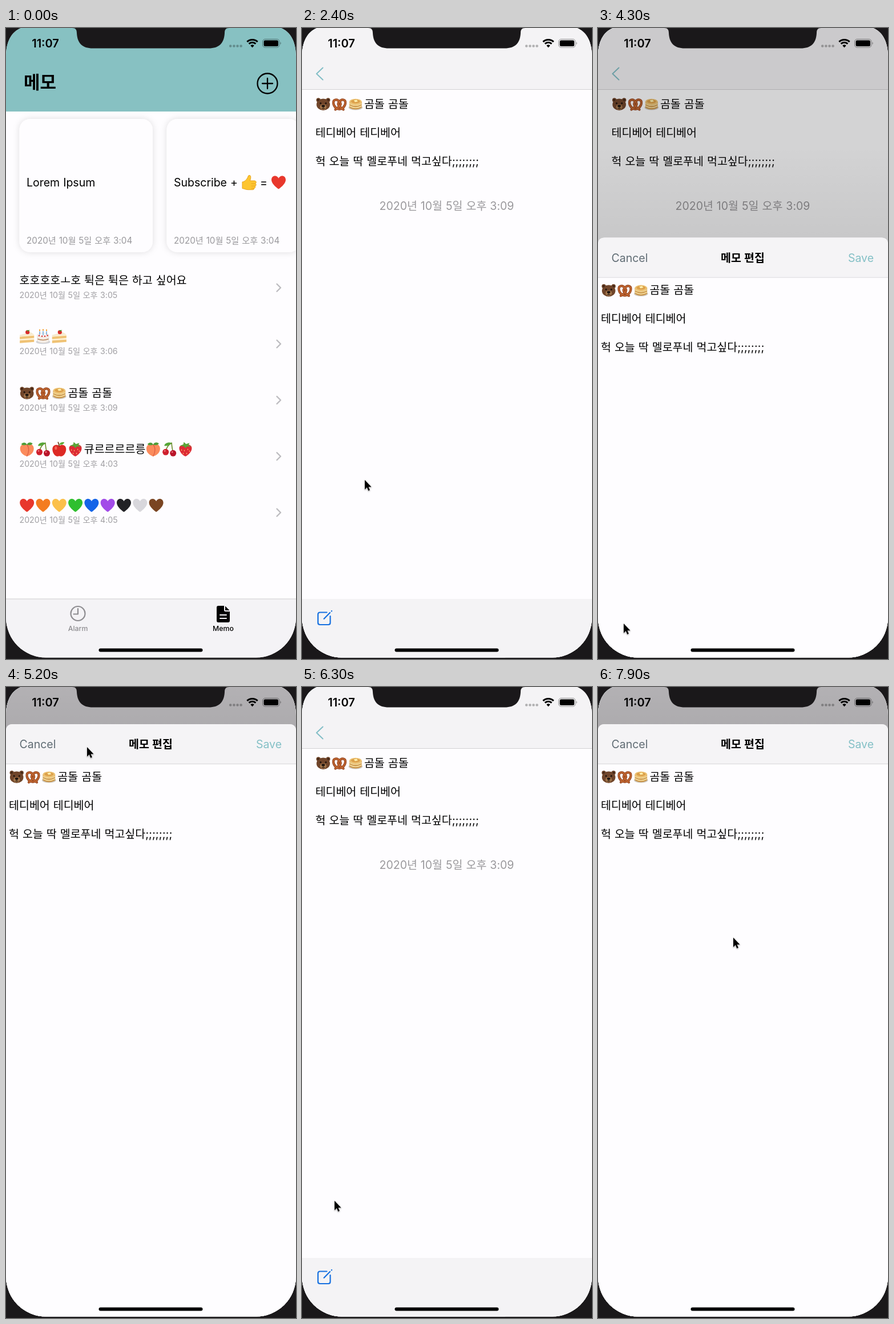
These frames come from a looping animation (508 by 1103 pixels, 8000 ms). An HTML page:

```html
<!DOCTYPE html>
<html lang="ko">
<head>
<meta charset="utf-8">
<title>메모</title>
<style>
html, body { margin: 0; height: 100%; overflow: hidden; background: #1a181a; }
svg { display: block; width: 100vw; height: 100vh; }
text { font: 19.5px Inter, "Noto Sans CJK KR", "Noto Sans CJK", sans-serif; word-spacing: .5px; white-space: pre; }
.line { fill: none; stroke-linecap: round; stroke-linejoin: round; }
</style>
</head>
<body>
<svg viewBox="0 0 508 1103">
<defs>
  <clipPath id="screen"><path d="M0 50C0 16 16-3 44-3H464C492-3 508 16 508 50V1031A70 70 0 0 1 438 1100.500H70A70 70 0 0 1 0 1031Z"/></clipPath>
  <clipPath id="shelf"><rect y="146" width="508" height="258"/></clipPath>
  <filter id="soft" x="-20%" y="-20%" width="140%" height="140%">
    <feDropShadow dx="0" dy="0" stdDeviation="6" flood-opacity=".13"/>
  </filter>
  <linearGradient id="fade" x2="0" y2="1">
    <stop stop-opacity="0"/><stop offset="1" stop-opacity=".08"/>
  </linearGradient>

  <path id="heart" d="M0 11.5C-6 7.5-12.5 1-12.5-4.5-12.5-9-9.5-11.5-6.3-11.5-3.5-11.5-1.2-9.8 0-7.2 1.2-9.8 3.5-11.5 6.3-11.5 9.5-11.5 12.5-9 12.5-4.5 12.5 1 6 7.5 0 11.5Z"/>
  <g id="thumb">
    <path fill="#fdc530" stroke="#e9a21c" d="M-12-1C-8-1-5-5-3-8-2-10-2-12.500.3-12.500 3.500-12.500 3.200-8 1.500-3H9C13-3 13 1.500 10.500 2 13 3 12.500 6 10 6.300 11.500 7.500 10.800 10 8.300 10.200 9 12 7.500 12.700 5.500 12.700H-2C-6 12.700-8 11-12 10.500Z"/>
    <path class="line" stroke="#e9a21c" d="M4 2H10M4 6.200H10M4 10.200H8"/>
  </g>
  <g id="slice">
    <path fill="#fff3d8" d="M-12.500-3 6-8 12.500-4V9L-12.500 11Z"/>
    <path fill="#efc275" d="M-12.500 0 12.500-2V2L-12.500 4ZM-12.500 6.500 12.500 5V9L-12.500 11Z"/>
    <path fill="#f6ead0" d="M-12.500-3 6-8 12.500-4-12.500 0Z"/>
    <circle cx="1" cy="-8" r="3.600" fill="#d92c2a"/><path fill="#4c9a35" d="M-1-11 5-12 2-9Z"/>
  </g>
  <g id="cake">
    <ellipse cy="9" rx="12.500" ry="3.500" fill="#cfd2d8"/>
    <path fill="#f5eee7" stroke="#d5cdc6" stroke-width=".6" d="M-10-3V8C-7 11.500 7 11.500 10 8V-3Z"/>
    <ellipse cy="-3" rx="10" ry="3.200" fill="#fff" stroke="#d9cfca" stroke-width=".6"/>
    <path class="line" stroke="#b8885f" stroke-width="1.500" d="M-9 4Q0 7.500 9 4"/>
    <path class="line" stroke="#6aa5d5" stroke-width="1.500" d="M-6-4V-9M0-3V-9.500M6-4V-9"/>
    <path class="line" stroke="#f39a24" stroke-width="2" d="M-6-11V-12M0-11.500V-12.500M6-11V-12"/>
    <path class="line" stroke="#d8322f" stroke-width="2.500" d="M-7-2H-6.900M-2-1H-1.900M3-1H3.100M7.500-2.200H7.600"/>
  </g>
  <g id="bear">
    <g fill="#70452a"><circle cx="-8.500" cy="-7" r="3.700"/><circle cx="8.500" cy="-7" r="3.700"/><ellipse cy=".8" rx="11.800" ry="10.200"/></g>
    <g fill="#432717"><circle cx="-8.800" cy="-7.300" r="1.900"/><circle cx="8.800" cy="-7.300" r="1.900"/></g>
    <ellipse cy="5" rx="5.500" ry="4.600" fill="#a87a4e"/>
    <g fill="#1c120d"><circle cx="-4.600" cy="-1.500" r="1.500"/><circle cx="4.600" cy="-1.500" r="1.500"/><ellipse cy="3.200" rx="3" ry="2"/></g>
    <path class="line" stroke="#1c120d" d="M0 5V7M-2.500 7.300Q0 8.800 2.500 7.300"/>
  </g>
  <g id="pretzel" class="line">
    <path id="twist" stroke="#91401d" stroke-width="4.200" d="M-7 9.500C1 4 5 0 0-4-4-10-11-8-10.500-2-10 5-4 9 0 9 4 9 10 5 10.500-2 11-8 4-10 0-4-5 0-1 4 7 9.500"/>
    <path stroke="#bf6530" stroke-width="2.200" d="M-7 9.500C1 4 5 0 0-4-4-10-11-8-10.500-2-10 5-4 9 0 9 4 9 10 5 10.500-2 11-8 4-10 0-4-5 0-1 4 7 9.500"/>
  </g>
  <g id="pancakes">
    <ellipse cy="6" rx="12.300" ry="4.500" fill="#cfc9c0"/>
    <path fill="#c79145" d="M-10.800-4V5.500C-7 10.500 7 10.500 10.800 5.500V-4Z"/>
    <path class="line" stroke="#f1d596" stroke-width="2.200" d="M-10-.5Q0 5 10-.5M-10 3.500Q0 9 10 3.500"/>
    <ellipse cy="-4" rx="11" ry="5.200" fill="#ecc274"/>
    <ellipse cy="-4.500" rx="8" ry="3.300" fill="#dca04a"/><path fill="#fff0ae" d="M-3-6.500 2-7.500 4-4.500-1-3.500Z"/>
  </g>
  <g id="peach">
    <path fill="#fb8b5c" d="M0-8C5-12 12-8 12-1 12 7 5 11 0 12.500-5 11-12 7-12-1-12-8-5-12 0-8Z"/>
    <path class="line" stroke="#dd5f43" stroke-width="1.300" d="M0-8C4-3 4 5 0 12"/>
    <path fill="#4f9d38" d="M0-8C-5-6-9-7-10-9-6-13-2-12 0-8 1-12 6-13 10-10 8-7 4-6 0-8Z"/>
  </g>
  <g id="cherry">
    <path class="line" stroke="#6d8a2d" stroke-width="1.600" d="M-6 3C-5-4-1-8 4-11 4-6 5-1 6 4"/>
    <path fill="#55a637" d="M4-11C-1-13-8-11-9-6-4-5 1-7 4-11Z"/>
    <circle cx="-6.500" cy="5" r="5.500" fill="#cf1f2d"/><circle cx="6.500" cy="7" r="5.500" fill="#b9152a"/>
    <g fill="#f2818a"><circle cx="-8" cy="3" r="1.300"/><circle cx="5" cy="5" r="1.300"/></g>
  </g>
  <g id="apple">
    <path fill="#dd2a24" d="M0-6C4-9 12-8 12 0 12 7 7 12.500 3.500 12.500 1.500 12.500 1 12 0 12-1 12-1.500 12.500-3.500 12.500-7 12.500-12 7-12 0-12-8-4-9 0-6Z"/>
    <path class="line" stroke="#6e4424" stroke-width="1.700" d="M0-5Q-.5-9-2-12"/>
    <path fill="#5dab36" d="M0-8C1-12 5-13 9-12 7-8 4-7 0-8Z"/><ellipse cx="-6" cy="-2" rx="2" ry="3" fill="#f0695c"/>
  </g>
  <g id="berry">
    <path fill="#de2b35" d="M-11-3C-10-9 8-11 10.500-4 13 3 4 11 0 12.500-4 12-12 4-11-3Z"/>
    <path fill="#58a538" d="M-10-6-4-8-3-12.500 1-9 7-11 5-7 10-4 3-5 0-2-3-5Z"/>
    <path class="line" stroke="#f8c06a" stroke-width="1.300" d="M-7 1V2M-2 2V3M4 0V1M-4 7V8M2 7V8M7 3V4"/>
  </g>
</defs>

<g clip-path="url(#screen)">
  <rect width="508" height="1103" fill="#fefdff"/>
  <g id="list">
    <rect width="508" height="146" fill="#87c1c2"/>
    <text x="31" y="105.500" style="font-size:31px;font-weight:700">메모</text>
    <path class="line" stroke="#000" stroke-width="2.300" d="M440.500 97a17.500 17.500 0 1 1 35 0a17.500 17.500 0 1 1-35 0M449 97h18M458 88v18"/>
    <g clip-path="url(#shelf)" fill="#fefdff">
      <rect x="23.500" y="159" width="233.500" height="233" rx="19" filter="url(#soft)"/>
      <rect x="281.500" y="159" width="233.500" height="233" rx="19" filter="url(#soft)"/>
    </g>
    <g id="cards"></g>
    <g id="rows"></g>
    <rect y="998" width="508" height="105" fill="#f4f3f6"/>
    <rect y="997.500" width="508" height="1" fill="#cfcdd0"/>
    <g class="line" stroke="#8e8d91" stroke-width="2.200"><circle cx="126" cy="1023.500" r="12.500"/><path d="M126 1015V1024.500H118.500"/></g>
    <text x="126" y="1054" text-anchor="middle" fill="#8e8d91" style="font-size:12.300px;font-weight:500">Alarm</text>
    <path d="M372 1010H382V1017.500Q382 1020 384.500 1020H392V1036Q392 1039 389 1039H372Q369 1039 369 1036V1013Q369 1010 372 1010ZM384 1010.500 391.500 1018H384Z"/>
    <path class="line" stroke="#f4f3f6" stroke-width="2" d="M375 1026H386M375 1032H386"/>
    <text x="380.500" y="1054" text-anchor="middle" style="font-size:12.300px;font-weight:500">Memo</text>
  </g>

  <g id="detail">
    <rect width="508" height="1103" fill="#fefdff"/>
    <rect width="508" height="107" fill="#f4f3f5"/>
    <rect y="107" width="508" height="1" fill="#d3d2d4"/>
    <path class="line" stroke="#82bec6" stroke-width="2" d="M36.500 69.500 25.500 80 36.500 90.500"/>
    <g id="note" transform="translate(24 133)"></g>
    <text x="253.500" y="317.500" text-anchor="middle" fill="#9a999c">2020년 10월 5일 오후 3:09</text>
    <rect y="998" width="508" height="105" fill="#f4f3f5"/>
    <path class="line" stroke="#1670e0" stroke-width="2.200" d="M43.500 1021.500H31.500Q28 1021.500 28 1025V1039.500Q28 1043 31.500 1043H46Q49.500 1043 49.500 1039.500V1028M38.500 1032.800 49 1022M51.800 1019.300 52 1019"/>
  </g>

  <rect id="dim" width="508" height="1103" fill="#0a060a"/>
  <g id="sheet">
    <rect id="shade" y="-160" width="508" height="172" fill="url(#fade)"/>
    <path fill="#fefdff" d="M0 12Q0 0 12 0H496Q508 0 508 12V1103H0Z"/>
    <path fill="#f5f4f6" d="M0 12Q0 0 12 0H496Q508 0 508 12V69H0Z"/>
    <rect y="69" width="508" height="1" fill="#d8d7d9"/>
    <text x="23.500" y="42" fill="#606c74">Cancel</text>
    <text x="253.500" y="42" text-anchor="middle" style="font-weight:700">메모 편집</text>
    <text x="483" y="42" text-anchor="end" fill="#84c0c6">Save</text>
    <use href="#note" transform="translate(-18.500 -41)"/>
  </g>

  <text x="69" y="34" text-anchor="middle" style="font-size:20px;font-weight:600">11:07</text>
  <path class="line" stroke="#000" stroke-opacity=".28" stroke-width="4.600" d="M393.200 31.500h.01M399.400 31.500h.01M405.500 31.500h.01M411.600 31.500h.01"/>
  <path fill="none" stroke="#000" stroke-width="3" d="M422.300 24.100A13.500 13.500 0 0 1 440.700 24.100M425.600 27.700A8.600 8.600 0 0 1 437.400 27.700"/>
  <path d="M431.500 34.200 428.300 30.800A4.700 4.700 0 0 1 434.700 30.800Z"/>
  <rect x="449.500" y="19.500" width="29.500" height="14.500" rx="4.500" fill="none" stroke="#000" stroke-opacity=".4"/>
  <rect x="451.500" y="21.500" width="25.500" height="10.500" rx="2.500"/>
  <path fill-opacity=".4" d="M480.500 24.500Q483 26.700 480.500 29Z"/>
  <rect x="162.500" y="1084.500" width="182" height="6" rx="3"/>
</g>
<path fill="#1a181a" d="M116 0C122 0 124 3 124 9 125 27 134 35.500 152 35.500H355C373 35.500 382 27 383 9 383 3 385 0 391 0Z"/>
<g id="cursor"><path stroke="#fff" paint-order="stroke" transform="scale(.95)" style="filter:drop-shadow(0 1px 1px #0005)" d="M0 0V17.500L4 13.800 6.600 20 9.400 18.800 6.800 12.800H12.200Z"/></g>
</svg>

<script>
const $ = id => document.getElementById(id);
const GAP = 28.3, SYL = 18;
const text = (x, y, s, size = 19.5, fill = '#000') =>
  `<text x="${x}" y="${y}" fill="${fill}" style="font-size:${size}px">${s}</text>`;
const icon = (id, x, y, fill = '#e8372c') =>
  `<use href="#${id}" transform="translate(${x} ${y})" fill="${fill}"/>`;
const icons = (ids, x, y) => ids.map((id, i) => icon(id, x + 13.2 + GAP * i, y)).join('');
const day = time => `2020년 10월 5일 오후 ${time}`;

// Icons, then words, then more icons, centred on y
function line(x, y, before, words = '', after = []) {
  const wx = x + GAP * before.length;
  return icons(before, x, y) + text(wx, y + 6.7, words) + icons(after, wx + SYL * words.length, y);
}

$('cards').innerHTML =
  text(36, 277, 'Lorem Ipsum') + text(294, 277, 'Subscribe +') + text(445, 277, '=') +
  icon('thumb', 426, 270) + icon('heart', 477.5, 270) +
  [36, 294].map(x => text(x, 377, day('3:04'), 15.25, '#99989c')).join('');

const fruit = ['peach', 'cherry', 'apple', 'berry'];
const hues = ['#e8372c', '#f47c20', '#fbc04a', '#2fbf2f', '#1464e8', '#a24be8', '#222226', '#d8d7dc', '#7a4522'];
const rows = [
  ['3:05', y => line(23.5, y, [], '호호호호ㅗ호 튁은 튁은 하고 싶어요')],
  ['3:06', y => line(23.5, y, ['slice', 'cake', 'slice'])],
  ['3:09', y => line(23.5, y, ['bear', 'pretzel', 'pancakes'], '곰돌 곰돌')],
  ['4:03', y => line(23.5, y, fruit, '큐르르르르릉', ['peach', 'cherry', 'berry'])],
  ['4:05', y => hues.map((c, i) => icon('heart', 36.7 + GAP * i, y, c)).join('')]
];
$('rows').innerHTML = rows.map(([time, draw], i) => {
  const y = 441.5 + 98.25 * i;
  return draw(y) + text(23.5, y + 30.5, day(time), 14.2, '#a09fa3') +
    `<path class="line" stroke="#bdbcc0" stroke-width="2.4" d="M474.5 ${y + 6}l6.5 6.5-6.5 6.5"/>`;
}).join('');

$('note').innerHTML = line(0, 0, ['bear', 'pretzel', 'pancakes'], '곰돌 곰돌') +
  line(-.5, 50, [], '테디베어 테디베어') +
  line(-.5, 100, [], '헉 오늘 딱 멜로푸네 먹고싶다;;;;;;;;');

// Pointer path: time, x, y
const path = [
  [100, 520, 560], [900, 250, 640], [1700, 140, 645], [1950, 140, 645], [2400, 110, 790],
  [2800, 110, 790], [3200, 176, 800], [3600, 43, 901], [3800, 45, 1041], [4350, 45, 1041],
  [5200, 142, 105], [5300, 72, 97], [5850, 72, 97], [6100, 108, 500], [6300, 57, 898],
  [6500, 57, 898], [6900, 36, 1038], [7300, 36, 1038], [7900, 237, 438], [8000, 237, 438]
];

function pointer(t) {
  const i = path.findIndex(p => p[0] > t);
  if (i < 1) return path[0].slice(1);
  const [a, b] = [path[i - 1], path[i]];
  const u = (t - a[0]) / (b[0] - a[0]), k = u * u * (3 - 2 * u);
  return [a[1] + (b[1] - a[1]) * k, a[2] + (b[2] - a[2]) * k];
}

// Critically damped spring from 0 to 1, settled after 600 ms
function spring(t, start) {
  const s = Math.max(0, t - start) * .01232;
  return Math.min(1, 1.006 * (1 - (1 + s) * Math.exp(-s)));
}

const move = (id, x, y) => $(id).setAttribute('transform', `translate(${x} ${y})`);

function frame() {
  const t = Math.floor((performance.now() + 20) / 100) * 100 % 8000;
  const push = spring(t, 1800);
  const open = spring(t, 4100) - spring(t, 5225) + spring(t, 7198);
  move('list', -152 * push, 0);
  move('detail', 508 * (1 - push), 0);
  move('sheet', 0, 1103 - 1038 * open);
  $('dim').setAttribute('opacity', .245 * open);
  $('shade').setAttribute('opacity', open);
  move('cursor', ...pointer(t));
  requestAnimationFrame(frame);
}
frame();
</script>
</body>
</html>
```
